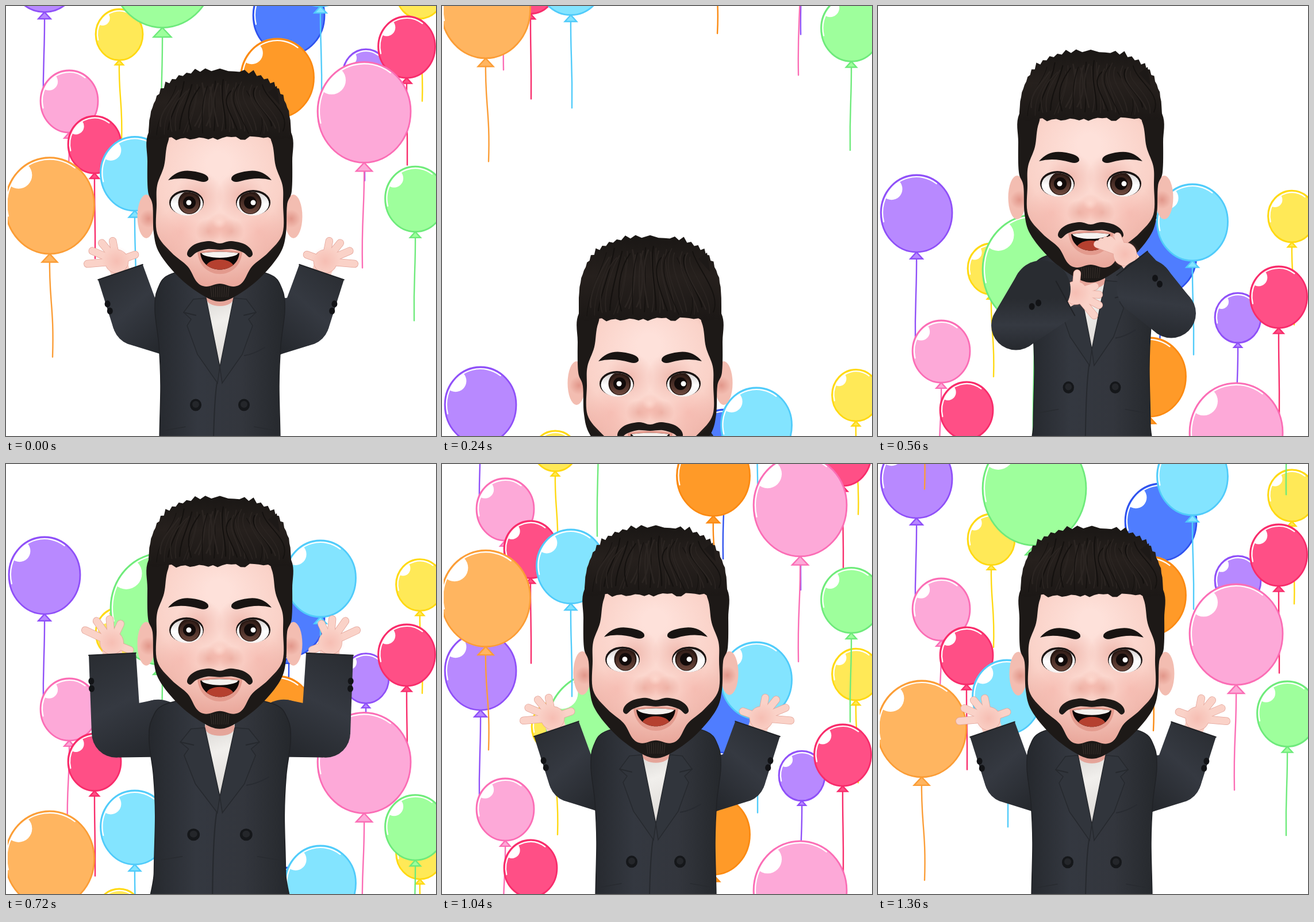
An HTML page with a canvas for the animation above (1440 ms loop, 748x748 px).

```html
<!DOCTYPE html>
<html lang="en">
<head>
<meta charset="utf-8">
<title>Balloons</title>
<style>
html, body { margin: 0; width: 100%; height: 100%; overflow: hidden; background: #fff; }
canvas { display: block; width: 748px; height: 748px; }
</style>
</head>
<body>
<canvas id="stage" width="748" height="748"></canvas>
<script>
const ctx = document.getElementById('stage').getContext('2d');
const STEP = 80, STEPS = 18, WAVE_GAP = 6, REF_STEP = 11, MID = 372;
const SKIN = '#fad2c8', SKIN_EDGE = '#e3a297', HAIR = '#1d1917', CLOTH_DARK = '#202226';

const palette = {
  purple: { fill: '#b889ff', edge: '#8f50f8', lean: -2 },
  yellow: { fill: '#ffe957', edge: '#ffd912', lean: 4 },
  green: { fill: '#9eff9c', edge: '#6eea7b', lean: -2 },
  blue: { fill: '#4f7dff', edge: '#2f52ee', lean: -3 },
  sky: { fill: '#83e4ff', edge: '#50cbfa', lean: 2 },
  red: { fill: '#ff4f86', edge: '#f82c6b', lean: 1 },
  pink: { fill: '#fda9d8', edge: '#fb6db5', lean: -3 },
  orange: { fill: '#ff9a28', edge: '#fb8a12', lean: 7 },
  peach: { fill: '#ffb560', edge: '#fb9d36', lean: 5 }
};

// Back to front: colour, centre x, top at REF_STEP, width, rise per step
const balloons = [
  ['purple', 67, -41, 126, 83.5], ['yellow', 197, 86, 84, 81.5], ['green', 272, -54, 182, 104],
  ['blue', 492, 33, 126, 83.5], ['sky', 547, -45, 125, 88.5], ['yellow', 720, 9, 85, 77.8],
  ['purple', 626, 159, 82, 84.8], ['red', 697, 104, 101, 87], ['pink', 110, 198, 102, 87],
  ['red', 154, 283, 94, 92.5], ['sky', 224, 340, 121, 113.5], ['orange', 472, 160, 129, 104],
  ['pink', 623, 208, 164, 111.7], ['green', 712, 377, 107, 98.8], ['peach', 76, 376, 157, 113.4]
];

// Arm key poses: shoulder, elbow, wrist, finger angle, finger spread
const wide = [290, 560, 228, 548, 199, 463, -143, 28];
const raised = [265, 509, 192, 517, 185, 380, -110, 30];
const flip = ([sx, sy, ex, ey, wx, wy, a, s]) => [748 - sx, sy, 748 - ex, ey, 748 - wx, wy, -180 - a, -s];
const arms = [
  { wide, raised, clasped: [285, 523, 240, 586, 326, 539, 16, -23] },
  { wide: flip(wide), raised: flip(raised), clasped: [465, 520, 510, 565, 442, 478, -148, 8] }
];

const rad = deg => deg * Math.PI / 180;
const noise = i => { const v = Math.sin(i * 12.9898) * 43758.5453; return v - Math.floor(v); };
const ramp = (a, b, t) => { const k = Math.min(1, Math.max(0, (t - a) / (b - a))); return k * k * (3 - 2 * k); };
const arch = (from, length, t) => t > from && t < from + length ? Math.sin(Math.PI * (t - from) / length) : 0;

// Crouch, hop past the rest height, then settle
function poseAt(step) {
  const dip = arch(0, 6, step) ** 2;
  return {
    dip,
    rise: 290 * dip - 56 * arch(6, 5, step) - 3 * arch(11, 7, step),
    clasp: ramp(0, 2, step) * (1 - ramp(7, 9, step)),
    raise: ramp(7, 9, step) * (1 - ramp(9, 11, step))
  };
}

function polygon(p) {
  ctx.beginPath();
  for (let i = 0; i < p.length; i += 2) ctx.lineTo(p[i], p[i + 1]);
  ctx.closePath();
}

// Closed curve through a left half outline and its mirror image
function symmetric(half) {
  const pts = [];
  for (let i = 0; i < half.length; i += 2) pts.push([half[i], half[i + 1]]);
  for (const [x, y] of [...pts].reverse()) if (x !== MID) pts.push([2 * MID - x, y]);
  const n = pts.length, g = i => pts[(i + n) % n];
  ctx.beginPath();
  ctx.moveTo(...pts[0]);
  for (let i = 0; i < n; i++) {
    const [a, b, c, d] = [g(i - 1), g(i), g(i + 1), g(i + 2)];
    ctx.bezierCurveTo(b[0] + (c[0] - a[0]) / 6, b[1] + (c[1] - a[1]) / 6,
      c[0] - (d[0] - b[0]) / 6, c[1] - (d[1] - b[1]) / 6, c[0], c[1]);
  }
}

function paint(fill, edge, width = 2) {
  if (fill) { ctx.fillStyle = fill; ctx.fill(); }
  if (edge) { ctx.strokeStyle = edge; ctx.lineWidth = width; ctx.stroke(); }
}

function ellipse(x, y, rx, ry = rx, fill) {
  ctx.beginPath();
  ctx.ellipse(x, y, rx, ry, 0, 0, Math.PI * 2);
  if (fill) paint(fill);
}

function line(color, width, x, y, ...p) {
  ctx.beginPath();
  ctx.moveTo(x, y);
  if (p.length === 2) ctx.lineTo(...p);
  else if (p.length === 4) ctx.quadraticCurveTo(...p);
  else ctx.bezierCurveTo(...p);
  paint(null, color, width);
}

function glow(x, y, r, rgb, alpha) {
  const g = ctx.createRadialGradient(x, y, 0, x, y, r);
  g.addColorStop(0, `rgba(${rgb},${alpha})`);
  g.addColorStop(1, `rgba(${rgb},0)`);
  ellipse(x, y, r, r, g);
}

function blend(stops, x0, y0, x1, y1) {
  const g = ctx.createLinearGradient(x0, y0, x1, y1);
  stops.forEach((c, i) => g.addColorStop(i / (stops.length - 1), c));
  return g;
}

function moved(x, y, draw) {
  ctx.save();
  ctx.translate(x, y);
  draw();
  ctx.restore();
}

function mirrored(draw) {
  draw();
  moved(2 * MID, 0, () => { ctx.scale(-1, 1); draw(); });
}

function drawBalloon([color, cx, refTop, w, rise], age) {
  const { fill, edge, lean } = palette[color];
  const top = refTop + (REF_STEP - age) * rise, h = w * 1.08, bottom = top + h;
  const string = 100 + w / 2, end = bottom + string;
  if (top > 760 || end < -10) return;
  const knot = w * .085, cy = top + h * .49, r = w / 2 - 1, ry = h * .49 - 1;

  line(edge, 2.4, cx, bottom, cx - lean / 3, bottom + string * .45, cx + lean * 1.6, bottom + string * .5, cx + lean, end);
  polygon([cx, bottom - 1, cx + knot, bottom + knot, cx - knot, bottom + knot]);
  paint(fill, edge, 2.4);

  ctx.beginPath();
  ctx.ellipse(cx, cy, r, ry, 0, Math.PI, 0);
  ctx.bezierCurveTo(cx + r, cy + h * .28, cx + r * .55, bottom - 1, cx, bottom - 1);
  ctx.bezierCurveTo(cx - r * .55, bottom - 1, cx - r, cy + h * .28, cx - r, cy);
  paint(fill, edge, 2.8);

  ctx.save();
  ellipse(cx, cy, r - 3, ry - 3);
  ctx.clip();
  ellipse(cx - w * .345, top + h * .185, w * .15, h * .14, '#fff');
  ctx.restore();
  ctx.beginPath();
  ctx.ellipse(cx, cy, r - 3, ry - 3, 0, Math.PI * .92, Math.PI * 1.7);
  paint(null, '#fff', 2.2);
}

function drawHand(x, y, angle, spread) {
  const fingers = [{ a: angle + spread * 4.4, length: 34 }];
  for (let i = 0; i < 4; i++) fingers.push({ a: angle + spread * (1.5 - i), length: 36 + 5 * i });
  for (const [color, grow] of [[SKIN_EDGE, 1.5], [SKIN, 0]]) {
    ellipse(x, y, 20 + grow / 2, 20 + grow / 2, color);
    for (const { a, length } of fingers) {
      const dx = Math.cos(rad(a)), dy = Math.sin(rad(a));
      line(color, 12 + grow, x + dx * 8, y + dy * 8, x + dx * length, y + dy * length);
    }
  }
  glow(x, y, 26, '240,160,148', .4);
}

// Tapered section with a round far end
function drawSection(x0, y0, r0, x1, y1, r1, fill) {
  const a = Math.atan2(y1 - y0, x1 - x0), nx = -Math.sin(a), ny = Math.cos(a);
  polygon([x0 + nx * r0, y0 + ny * r0, x1 + nx * r1, y1 + ny * r1, x1 - nx * r1, y1 - ny * r1, x0 - nx * r0, y0 - ny * r0]);
  paint(fill);
  ellipse(x1, y1, r1, r1, fill);
}

function drawArm(arm, side, clasp, raise) {
  const [sx, sy, ex, ey, wx, wy, angle, spread] = arm.wide.map((v, i) =>
    v + (arm.clasped[i] - v) * clasp + (arm.raised[i] - v) * raise);
  const a = Math.atan2(wy - ey, wx - ex), dx = Math.cos(a), dy = Math.sin(a);
  const cuff = 41 - 7 * clasp;
  const cloth = blend(['#292c31', '#353941', '#25282d'], wx - 42 * side, wy, ex + 45 * side, ey + 45);
  const hand = () => {
    line(SKIN, 34, wx, wy, wx + dx * 16, wy + dy * 16);
    drawHand(wx + dx * 20, wy + dy * 20, angle, spread);
  };
  hand();
  drawSection(ex, ey, 43, sx, sy, 50, cloth);
  drawSection(wx, wy, cuff, ex, ey, 43, cloth);
  line(CLOTH_DARK, 2, wx - dy * cuff, wy + dx * cuff, wx + dy * cuff, wy - dx * cuff);
  const out = side * 39 * (1 - .6 * clasp);
  for (const back of [45, 58]) ellipse(wx - dx * back + dy * out, wy - dy * back - dx * out, 5, 6, '#121316');
}

function drawTorso() {
  symmetric([MID,452, 288,466, 264,492, 259,530, 266,590, 269,660, 267,760, 267,900]);
  paint(blend(['#25282d', '#343840', '#33363d', '#25282c'], 258, 0, 486, 0), CLOTH_DARK, 1.5);
  polygon([348,500, 396,500, 394,522, 372,628, 350,522]);
  paint(blend(['#d8d5d2', '#f1efec', '#e2dfdc'], 349, 500, 385, 600));
  ellipse(MID, 508, 24, 14, '#e5a59a');
  mirrored(() => {
    polygon([348,508, 326,510, 309,533, 322,545, 315,556, 333,606, 368,656, 372,628]);
    paint('#31353c', '#26292e', 1.5);
    line('#26292e', 2, 309, 533, 330, 538);
    line('#282b30', 1.5, 278, 738, 312, 732);
    ellipse(330, 694, 10, 10.5, '#15171a');
    ellipse(330, 693, 6, 6, '#24262a');
  });
  line('#26292e', 2, 367, 655, 360, 700, 360, 850);
  line('#282b31', 2, 415, 608, 430, 606, 450, 594);
}

function drawEye() {
  ellipse(314, 342, 30, 22, '#1a1413');
  ellipse(314.5, 344, 28, 20.5, blend(['#d5cfce', '#fff', '#f6f1f0'], 0, 323, 0, 366));
  ctx.save();
  ctx.clip();
  ellipse(319, 342, 19.5, 20, '#2a1914');
  ellipse(319, 344, 17, 17, blend(['#38221c', '#6d483d'], 0, 332, 0, 361));
  ellipse(319, 342, 11, 11, '#120b0a');
  ctx.restore();
}

function drawBrow() {
  ctx.beginPath();
  ctx.moveTo(282, 303);
  ctx.quadraticCurveTo(298, 284, 322, 287);
  ctx.quadraticCurveTo(354, 291, 352, 302);
  ctx.quadraticCurveTo(348, 308, 337, 305);
  ctx.quadraticCurveTo(306, 296, 282, 303);
  paint('#181412');
}

function drawMouth() {
  ctx.beginPath();
  ctx.moveTo(333, 428);
  ctx.quadraticCurveTo(MID, 420, 411, 428);
  ctx.bezierCurveTo(406, 479, 338, 479, 333, 428);
  paint('#e39a8d');
  ctx.beginPath();
  ctx.moveTo(338, 430);
  ctx.quadraticCurveTo(MID, 425, 406, 430);
  ctx.bezierCurveTo(402, 468, 342, 468, 338, 430);
  paint('#0e0908');
  ctx.save();
  ctx.clip();
  ellipse(MID, 454, 24, 13, '#b5402f');
  ellipse(MID, 429, 32, 9, '#f5f2ef');
  ctx.restore();
  symmetric([MID,413, 354,409, 332,413, 319,422, 315,432, 321,437, 331,429, 350,423, MID,424]);
  paint(HAIR);
}

function drawFace() {
  symmetric([MID,514, 340,502, 300,471, 267,430, 257,395, 255,346, 247,322, 246,270, 248,220, 290,170]);
  paint(HAIR);
  symmetric([MID,483, 348,488, 332,480, 316,453, 288,429, 263,396, 262,345, 263,312, 275,278, 282,236, 305,200]);
  const skin = ctx.createRadialGradient(370, 275, 20, 370, 320, 165);
  skin.addColorStop(0, '#fee1da');
  skin.addColorStop(.6, '#fad2c8');
  skin.addColorStop(1, '#eaa99d');
  paint(skin);
  mirrored(() => {
    glow(305, 392, 44, '240,150,140', .3);
    glow(336, 330, 42, '222,138,124', .4);
    glow(352, 392, 22, '214,118,102', .35);
    drawEye();
    drawBrow();
  });
  glow(MID, 386, 26, '238,150,136', .4);
  glow(371, 376, 12, '255,222,212', .7);
  for (const x of [318, 430]) ellipse(x, 342, 4.5, 4.5, '#fff');
  drawMouth();
  for (let i = 0; i < 9; i++) line('#39312d', 1, 356 + i * 4, 488, 358 + i * 3.5, 506);
}

// Squarish dome with seeded tufts; the fringe follows the nod
function drawHair(nod) {
  const fringe = 230 + nod, outline = [], peaks = 50, power = 2 / 2.6;
  for (let i = 0; i <= peaks; i++) {
    const a = Math.PI * (1 - i / peaks), tuft = i % 2 ? noise(i) * 9 * Math.sin(a) : 0;
    const cos = Math.cos(a), reach = 124 + tuft * .4;
    outline.push(MID + Math.sign(cos) * reach * Math.abs(cos) ** power,
      232 - (119 + tuft * 1.4) * Math.sin(a) ** power);
  }
  for (let x = 496; x >= 248; x -= 8) outline.push(x, fringe + (noise(x) - .5) * 7);
  polygon(outline);
  paint(blend(['#191614', '#26201d', '#1c1816'], 0, 105, 0, fringe));
  polygon([456,150, 471,139, 476,172]);
  paint(HAIR);
  for (let i = 0; i < 34; i++) {
    const t = i / 33, bend = (noise(i + 3) - .5) * 30, topX = 296 + t * 150, footX = 262 + t * 220;
    line(i % 3 ? '#2b2522' : '#14110f', 1 + noise(i) * 1.8, topX, 128 + noise(i + 9) * 20,
      topX + bend - 8, 165, footX + bend, 185 + nod, footX, fringe - 6 - noise(i) * 16);
  }
}

function drawHead(nod) {
  mirrored(() => {
    ellipse(244, 366, 15.5, 38, '#f3bdb1');
    glow(248, 370, 16, '214,125,112', .6);
  });
  moved(0, nod, drawFace);
  drawHair(nod);
}

function drawCharacter({ dip, rise, clasp, raise }) {
  const bodyY = rise * .925, inFront = clasp > .5;
  const drawArms = () => moved(0, bodyY + 60 * dip, () => {
    ctx.lineCap = 'round';
    arms.forEach((arm, i) => drawArm(arm, i ? -1 : 1, clasp, raise));
  });
  if (!inFront) drawArms();
  moved(MID, bodyY, () => {
    ctx.scale(1 + .09 * raise - .03 * clasp, 1);
    ctx.translate(-MID, 0);
    drawTorso();
  });
  moved(-8 * dip - 2 * clasp, rise, () => drawHead(25 * dip));
  if (inFront) drawArms();
}

function drawScene(step) {
  ctx.fillStyle = '#fff';
  ctx.fillRect(0, 0, 748, 748);
  ctx.save();
  ctx.beginPath();
  ctx.rect(3, 0, 745, 748);
  ctx.clip();
  ctx.lineCap = 'round';
  // Later waves sit behind earlier ones
  const waves = [step, step - WAVE_GAP, step + STEPS - WAVE_GAP].sort((a, b) => a - b);
  for (const age of waves) for (const balloon of balloons) drawBalloon(balloon, age);
  drawCharacter(poseAt(step));
  ctx.restore();
}

let shown = -1;
function tick() {
  const step = Math.floor(performance.now() / STEP) % STEPS;
  if (step !== shown) drawScene(shown = step);
  requestAnimationFrame(tick);
}
tick();
</script>
</body>
</html>
```
